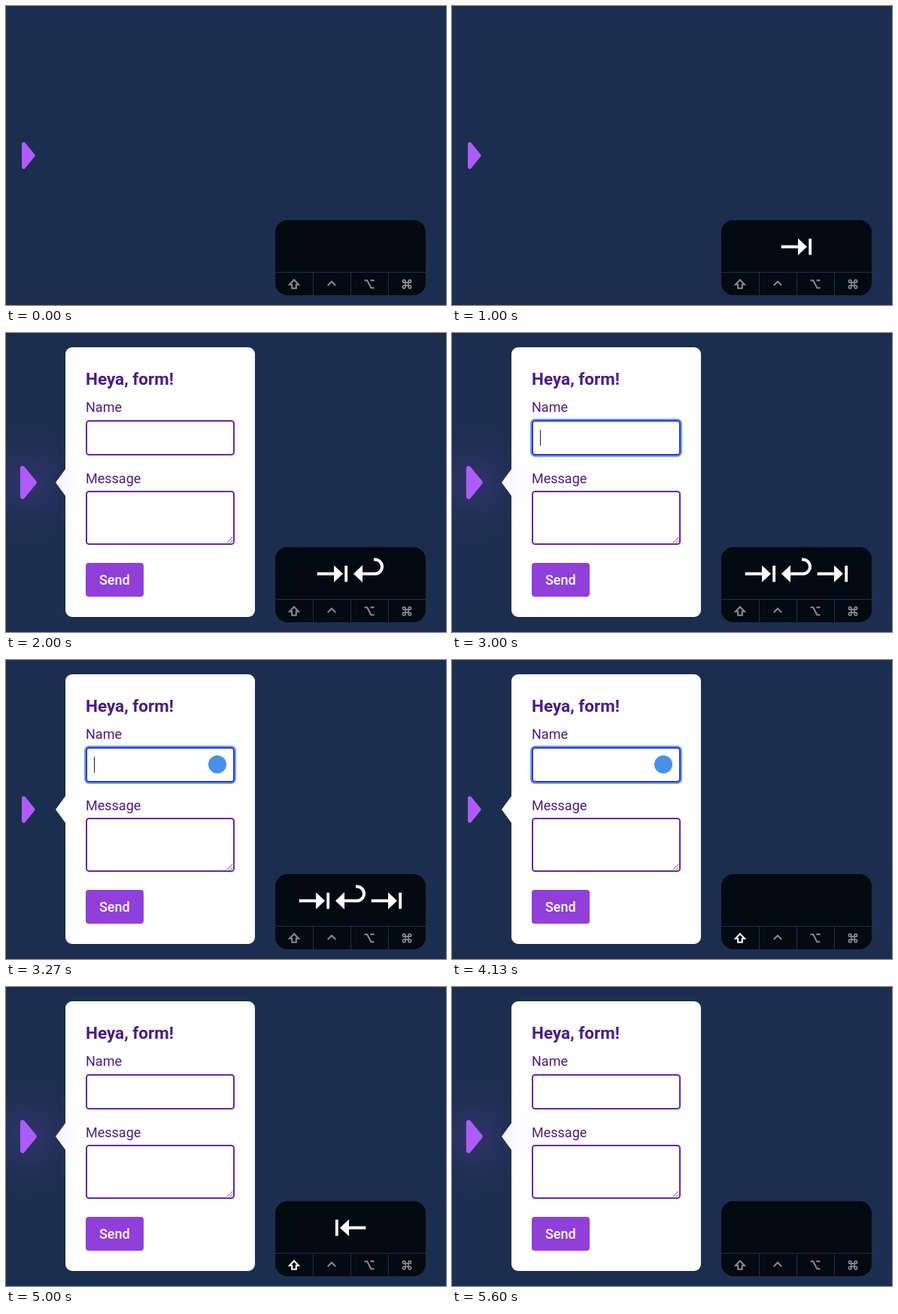
An HTML page with a canvas for the animation above (6.67 s loop, 585x398 px).

```html
<!DOCTYPE html>
<html lang="en">
<head>
<meta charset="utf-8">
<title>Keyboard form toggle</title>
<style>
  html, body { margin: 0; width: 100%; height: 100%; overflow: hidden; background: #1c2e4f; }
  canvas { display: block; width: 585px; height: 398px; }
</style>
</head>
<body>
<canvas id="stage" width="585" height="398"></canvas>
<script>
const ctx = document.getElementById('stage').getContext('2d');
const LOOP = 6670;
const BG = '#1c2e4f', PANEL = '#040a12', TEXT = '#4b1a86', BORDER = '#6c24a8';

const clamp = v => Math.max(0, Math.min(1, v));
const ramp = (t, start, length) => clamp((t - start) / length);
const ease = p => 1 - Math.pow(1 - p, 2.3);
const gray = v => `rgb(${v},${v + 2},${v + 6})`;

function box(x, y, w, h, r, color) {
  ctx.fillStyle = color;
  ctx.beginPath();
  ctx.roundRect(x, y, w, h, r);
  ctx.fill();
}

function outline(x, y, w, h, r, color, width) {
  ctx.strokeStyle = color;
  ctx.lineWidth = width;
  ctx.beginPath();
  ctx.roundRect(x, y, w, h, r);
  ctx.stroke();
}

function trace(points, closed) {
  ctx.beginPath();
  points.forEach(([x, y]) => ctx.lineTo(x, y));
  if (closed) ctx.closePath();
}

function text(str, x, y, weight, size, color) {
  ctx.font = `${weight} ${size}px Roboto, sans-serif`;
  ctx.fillStyle = color;
  ctx.fillText(str, x, y);
}

// Draws in local coordinates around x, y.
function at(x, y, draw, scaleX = 1, scaleY = 1) {
  ctx.save();
  ctx.translate(x, y);
  ctx.scale(scaleX, scaleY);
  draw();
  ctx.restore();
}

function tabKey() {
  ctx.fillRect(-20.3, -2, 23, 4);
  trace([[2, -11.2], [14, 0], [2, 11.2]], true);
  ctx.fill();
  ctx.fillRect(16.3, -10.8, 3.8, 21.6);
}

function returnKey() {
  trace([[-20, 0], [-8, -11.5], [-8, 11.5]], true);
  ctx.fill();
  ctx.lineWidth = 4;
  ctx.beginPath();
  ctx.moveTo(7, -19);
  ctx.arc(8.5, -9.5, 9.5, -Math.PI / 2, Math.PI / 2);
  ctx.lineTo(-9, 0);
  ctx.stroke();
}

const glyphs = {
  tab: x => at(x, 320.5, tabKey),
  back: x => at(x, 320.5, tabKey, -1),
  enter: x => at(x, 320.5, returnKey)
};

function shiftIcon() {
  trace([[0, -5.7], [-6, 0.6], [-2.8, 0.6], [-2.8, 5.5], [2.8, 5.5], [2.8, 0.6], [6, 0.6]], true);
  ctx.stroke();
}

function controlIcon() {
  trace([[-5.2, 1.8], [0, -3.4], [5.2, 1.8]]);
  ctx.stroke();
}

function optionIcon() {
  trace([[-6.5, -5], [-2.8, -5], [2.4, 5], [6.5, 5]]);
  ctx.stroke();
  trace([[1.5, -5], [6.5, -5]]);
  ctx.stroke();
}

function commandIcon() {
  for (const sx of [-1, 1]) for (const sy of [-1, 1]) {
    at(0, 0, () => {
      ctx.beginPath();
      ctx.moveTo(0, 2);
      ctx.lineTo(3.8, 2);
      ctx.arc(3.8, 3.8, 1.8, -Math.PI / 2, Math.PI);
      ctx.lineTo(2, 0);
      ctx.stroke();
    }, sx, sy);
  }
}

function keysAt(t) {
  if (t < 1000 || t >= 5600) return [];
  if (t < 2000) return ['tab'];
  if (t < 3000) return ['tab', 'enter'];
  if (t < 4000) return ['tab', 'enter', 'tab'];
  return t < 4670 ? [] : ['back'];
}

function drawPanel(t) {
  box(358, 285, 200, 100, 16, PANEL);
  ctx.fillStyle = '#1b2f52';
  ctx.fillRect(358, 354, 200, 1);
  for (const x of [408, 458, 508]) ctx.fillRect(x, 354, 1, 31);

  const shift = t < 5600 ? ramp(t, 3960, 100) : 0;
  const icons = [
    [shiftIcon, Math.round(135 + 114 * shift)],
    [controlIcon, 135],
    [optionIcon, 135],
    [commandIcon, Math.round(145 - 10 * ramp(t, 130, 70))]
  ];
  icons.forEach(([icon, level], i) => {
    ctx.strokeStyle = gray(level);
    ctx.lineWidth = i === 3 ? 1.7 : 2.1;
    at(383 + 50 * i, 370.2, icon);
  });

  ctx.fillStyle = ctx.strokeStyle = '#fff';
  const keys = keysAt(t);
  keys.forEach((key, i) => glyphs[key](458 + 48 * (i - (keys.length - 1) / 2)));
}

function drawNameField(t) {
  const focused = t >= 3000 && t < 4670;
  if (!focused) {
    outline(107, 117, 196, 45, 3.5, BORDER, 2);
    return;
  }
  outline(105.5, 115.5, 199, 48, 5, '#62a3f5', 3);
  outline(107, 117, 196, 45, 3.5, '#3b35c4', 2);
  if (t < 3670 || t >= 4200) {
    ctx.fillStyle = '#222';
    ctx.fillRect(117, 129, 1, 21);
  }
  if (t >= 3200) box(269, 127, 24, 24, 12, '#4a90e8');
}

function drawForm(t) {
  box(79, 19, 252, 359, 9, '#fff');
  trace([[66, 199], [79.5, 180.5], [79.5, 217.5]], true);
  ctx.fill();

  text('Heya, form!', 106, 69, 700, 22.5, TEXT);
  text('Name', 106, 105, 400, 18, TEXT);
  text('Message', 106, 200, 400, 18, TEXT);
  drawNameField(t);

  outline(107, 211, 196, 70, 3.5, BORDER, 2);
  ctx.strokeStyle = '#666';
  ctx.lineWidth = 1;
  for (const d of [7, 3]) {
    trace([[301 - d, 279], [301, 279 - d]]);
    ctx.stroke();
  }

  box(106, 306, 77, 45, 4, '#9040d9');
  text('Send', 124, 335, 500, 18, '#fff');
}

function focusAt(t) {
  if (t < 3000) return ease(ramp(t, 1060, 220));
  if (t < 4670) return 1 - ease(ramp(t, 3050, 220));
  return ease(ramp(t, 4730, 270));
}

function drawGlow(strength) {
  const g = ctx.createRadialGradient(28, 199, 0, 28, 199, 82);
  const stops = [[0, 0.17], [0.25, 0.125], [0.5, 0.06], [0.75, 0.02], [1, 0]];
  for (const [pos, a] of stops) g.addColorStop(pos, `rgba(150,75,240,${a * strength})`);
  ctx.fillStyle = g;
  ctx.fillRect(0, 110, 115, 180);
}

function drawToggle(t) {
  const focus = focusAt(t);
  drawGlow(t < 4670 ? focus : 0.85 + 0.15 * focus);
  const scale = 1 + 0.24 * focus;
  at(29.7, 199, () => {
    ctx.fillStyle = ctx.strokeStyle = '#ad5cfa';
    ctx.lineWidth = 5;
    ctx.lineJoin = 'round';
    trace([[-6.2, -15.3], [6.4, 0], [-6.2, 15.3]], true);
    ctx.fill();
    ctx.stroke();
  }, scale, scale);
}

function render(t) {
  ctx.fillStyle = BG;
  ctx.fillRect(0, 0, 585, 398);
  if (t >= 2000) drawForm(t);
  drawToggle(t);
  drawPanel(t);
}

const start = performance.now();
function tick() {
  render((performance.now() - start) % LOOP);
  requestAnimationFrame(tick);
}
tick();
</script>
</body>
</html>
```
